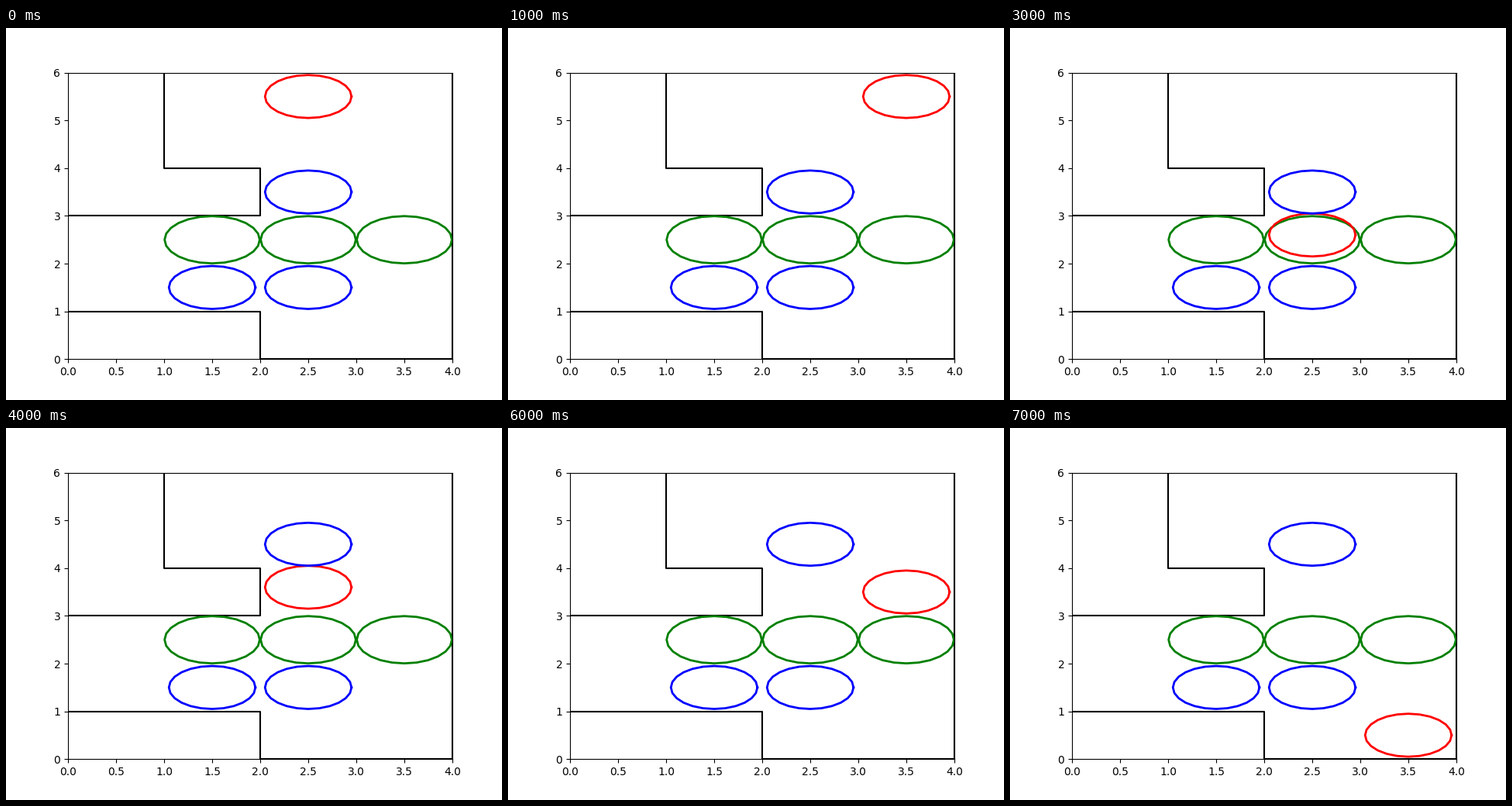
A matplotlib script that plays this animation: 640x480 px, repeating every 8000 ms.

```python
import matplotlib.pyplot as plt
import numpy as np
from matplotlib.animation import FuncAnimation

DIRECTIONS = {"R": (1, 0), "L": (-1, 0), "U": (0, 1), "D": (0, -1)}
MOVES = ["", "R", "DDD", "L", "U", "", "R", "DDD"]
PUSH_STEP = 4
NUDGE = 0.1  # the player leans on the box just before and during the push

angle = np.linspace(0, 2 * np.pi, 25)


def trace(start, path):
    """Points visited when walking the path in unit steps."""
    steps = [start] + [DIRECTIONS[letter] for letter in path]
    return np.cumsum(steps, axis=0)


def ring_points(center, radius):
    x, y = center
    return x + radius * np.cos(angle), y + radius * np.sin(angle)


def add_ring(center, radius, color):
    return ax.plot(*ring_points(center, radius), color=color, linewidth=2)[0]


def player_center(step):
    x, y = trace((2.5, 5.5), "".join(MOVES[:step + 1]))[-1]
    leaning = step in (PUSH_STEP - 1, PUSH_STEP)
    return x, y + NUDGE * leaning


def box_center(step):
    return 2.5, 3.5 + (step >= PUSH_STEP)


fig, ax = plt.subplots(figsize=(6.4, 4.8), dpi=100)
ax.set_xlim(0, 4)
ax.set_ylim(0, 6)

ax.plot(*trace((0, 3), "RRULUU").T, color="black")
ax.plot(*trace((0, 1), "RRDRRUUUUUU").T, color="black")

for column in range(1, 4):
    add_ring((column + 0.5, 2.5), 0.495, "green")
player = add_ring(player_center(0), 0.45, "red")
for column in range(1, 3):
    add_ring((column + 0.5, 1.5), 0.45, "blue")
pushed_box = add_ring(box_center(0), 0.45, "blue")


def update(step):
    player.set_data(*ring_points(player_center(step), 0.45))
    pushed_box.set_data(*ring_points(box_center(step), 0.45))
    return player, pushed_box


anim = FuncAnimation(fig, update, frames=len(MOVES), interval=1000,
                     repeat=True, repeat_delay=0)
plt.show()
```
